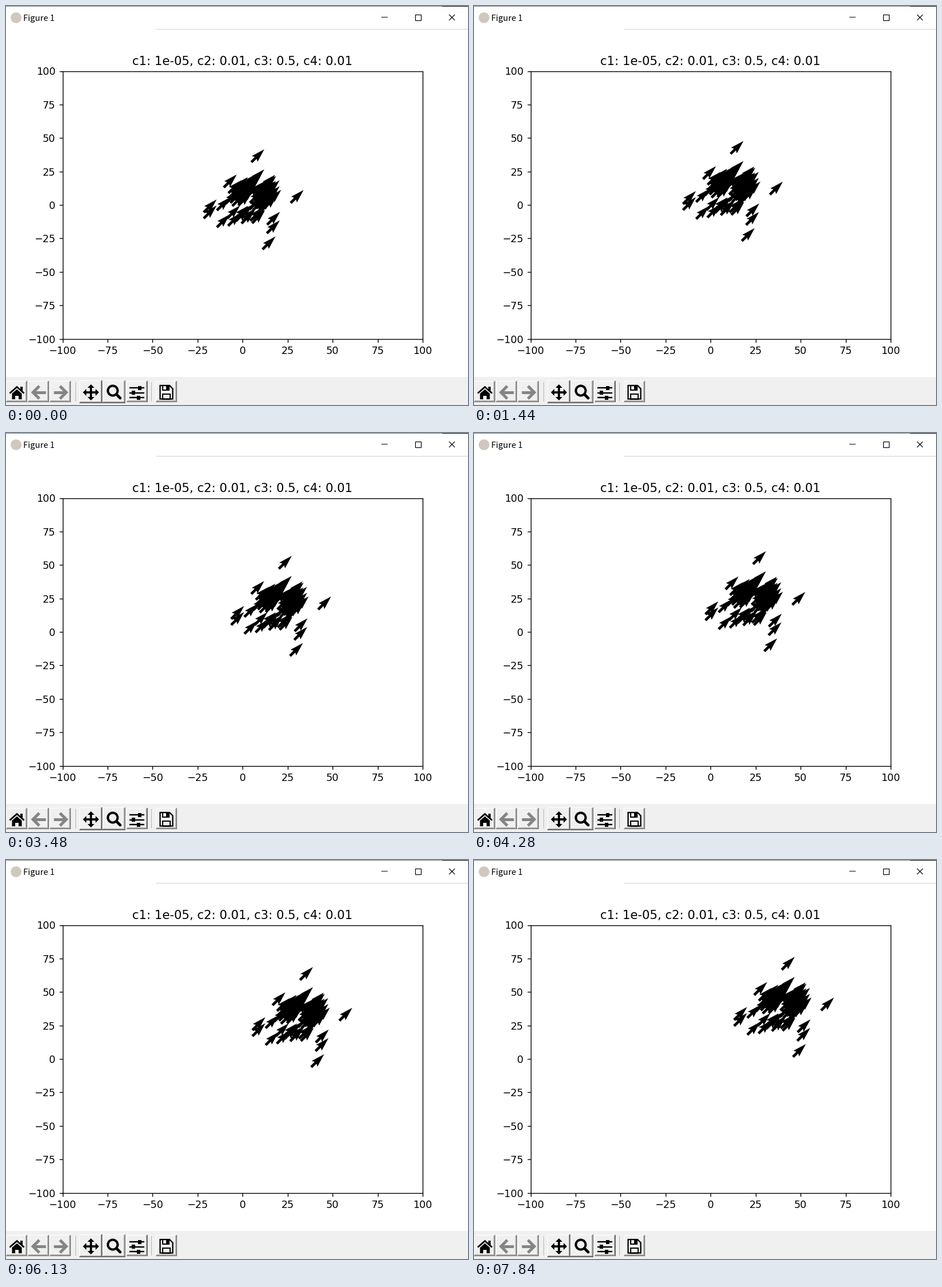
Recreate the animation shown at these times as a matplotlib script. Size 805x696 px, loop 8 s.

```python
import numpy as np
import matplotlib.pyplot as plt
from matplotlib.animation import FuncAnimation
from matplotlib.patches import Circle, Polygon, Rectangle

W, H, DPI = 805, 696, 100
PX = 72 / DPI          # one pixel in points
ZOOM = 1.265           # the window is shown enlarged
INTERVAL, LOOP = 20, 8000
TICK = 88.8            # ms between screen refreshes
FACE = "#f0f0f0"

fig = plt.figure(figsize=(W / DPI, H / DPI), dpi=DPI, facecolor="white")

# --- plot -------------------------------------------------------------
LEFT, RIGHT, TOP, BOTTOM = 98.5, 726, 113.5, 580.5
ax = fig.add_axes([LEFT / W, 1 - BOTTOM / H,
                   (RIGHT - LEFT) / W, (BOTTOM - TOP) / H])
ax.set(xlim=(-100, 100), ylim=(-100, 100),
       xticks=range(-100, 101, 25), yticks=range(-100, 101, 25))
ax.tick_params(length=3.5 * ZOOM, width=0.8 * ZOOM, pad=3.5 * ZOOM,
               labelsize=10 * ZOOM)
for spine in ax.spines.values():
    spine.set_linewidth(0.8 * ZOOM)
ax.set_title("c1: 1e-05, c2: 0.01, c3: 0.5, c4: 0.01",
             fontsize=12 * ZOOM, pad=6 * ZOOM)

# --- pixel-space layer for the window and the flock -------------------
ui = fig.add_axes([0, 0, 1, 1], facecolor="none")
ui.set(xlim=(0, W), ylim=(H, 0))
ui.axis("off")


def line(points, width=1.0, color="black", cap="butt"):
    x, y = zip(*points)
    ui.plot(x, y, color=color, lw=width * PX, solid_capstyle=cap,
            solid_joinstyle="miter")


def box(x, y, w, h, fill="black"):
    ui.add_patch(Rectangle((x, y), w, h, fc=fill, lw=0))


def frame(x, y, w, h, width):
    ui.add_patch(Rectangle((x, y), w, h, fill=False, ec="black",
                           lw=width * PX))


def poly(points):
    ui.add_patch(Polygon(points, fc="black", lw=0))


def title_bar():
    box(0, 0, 760, 1, "#7d7d7d")
    box(760, 0, 45, 1)
    box(261, 40, 544, 1, "#d0d0d0")
    ui.add_patch(Circle((17.5, 20.5), 9.3, fc="#cfc8bc", lw=0))
    ui.text(30, 26.3, "Figure 1", fontsize=14.7 * PX,
            family="Noto Sans CJK JP")
    box(654, 19, 11, 1.2)
    frame(713, 15, 9.5, 9.5, 1.2)
    line([(772, 15), (782, 25)], 1.2)
    line([(772, 25), (782, 15)], 1.2)


def button(cx, size=37):
    x, y = cx - size / 2, 672.5 - size / 2
    box(x, y, size, size, "#6d6d6d")
    box(x, y, size - 1.3, size - 1.3, "white")
    box(x + 1.3, y + 1.3, size - 2.6, size - 2.6, "#a5a5a5")
    box(x + 1.3, y + 1.3, size - 4, size - 4, FACE)


def home_icon(cx, cy):
    line([(cx - 12.5, cy + 1.5), (cx, cy - 9.5), (cx + 12.5, cy + 1.5)], 2.8)
    box(cx + 6, cy - 10.5, 3.5, 7)
    poly([(cx - 8.5, cy + 12), (cx - 8.5, cy + 2), (cx, cy - 5.3),
          (cx + 8.5, cy + 2), (cx + 8.5, cy + 12)])
    box(cx - 2.7, cy + 5.5, 5.4, 7, FACE)


def nav_icon(cx, cy, sign):
    gray = "#858585"
    line([(cx - 10 * sign, cy), (cx + 12 * sign, cy)], 5, gray)
    line([(cx + s, cy + h) for s, h in
          ((sign, -11), (-10 * sign, 0), (sign, 11))], 5, gray)


def pan_icon(cx, cy):
    line([(cx - 10, cy), (cx + 10, cy)], 3.8)
    line([(cx, cy - 10), (cx, cy + 10)], 3.8)
    for s in (-1, 1):
        poly([(cx + 14 * s, cy), (cx + 8 * s, cy - 6), (cx + 8 * s, cy + 6)])
        poly([(cx, cy + 14 * s), (cx - 6, cy + 8 * s), (cx + 6, cy + 8 * s)])


def zoom_icon(cx, cy):
    ui.add_patch(Circle((cx - 2, cy - 2.5), 8.5, fill=False, ec="black",
                        lw=4 * PX))
    line([(cx + 4.5, cy + 4), (cx + 11, cy + 10.5)], 4.8, cap="round")


def sliders_icon(cx, cy):
    for dy, knob in ((-8.5, 5), (0, -6), (8.5, 3)):
        line([(cx - 13, cy + dy), (cx + 13, cy + dy)], 2.4)
        box(cx + knob - 4, cy + dy - 3.5, 8, 7, FACE)
        box(cx + knob - 2.6, cy + dy - 3.5, 5.2, 7)


def save_icon(cx, cy):
    line([(cx - 11, cy - 12), (cx + 5.5, cy - 12), (cx + 11, cy - 6.5),
          (cx + 11, cy + 11.5), (cx - 11, cy + 11.5), (cx - 11, cy - 13)], 2.3)
    frame(cx - 6.5, cy + 2.5, 13, 9, 2)
    frame(cx - 6.5, cy - 12, 10.5, 7.5, 2)
    box(cx - 1, cy - 12, 4.5, 7)


def toolbar():
    box(0, 647, W, 49, FACE)
    for cx in (18.5, 56.5, 94.5, 228, 279.5):
        button(cx)
    for cx in (147.5, 188):
        button(cx, 40)
    for x in (120.5, 253):
        box(x, 656, 1.2, 34, "#b4b4b4")
    home_icon(19, 674)
    nav_icon(57, 674, 1)
    nav_icon(95, 674, -1)
    pan_icon(148, 674)
    zoom_icon(188, 673.5)
    sliders_icon(228, 674.5)
    save_icon(279.5, 674)


title_bar()
toolbar()


# --- flock: arrow tips in pixels at the start -------------------------
def cluster(cx, cy, rx, ry, tilt, n):
    """Spread n points evenly over a tilted ellipse (sunflower spiral)."""
    i = np.arange(n) + 0.5
    r, a = np.sqrt(i / n), i * np.pi * (3 - np.sqrt(5))
    u, v = rx * r * np.cos(a), ry * r * np.sin(a)
    c, s = np.cos(np.radians(tilt)), np.sin(np.radians(tilt))
    return np.column_stack([cx + u * c - v * s, cy + u * s + v * c])


stragglers = [(450, 250), (518.5, 321), (469.5, 402), (477, 374),
              (477.5, 359), (402, 294), (410, 304), (367, 337.5),
              (367, 348), (390, 334), (390, 363.5), (409.5, 361),
              (450, 285), (469, 294.5)]
tips = np.vstack([stragglers,
                  cluster(426, 310, 27, 14, -38, 17),
                  cluster(463, 319, 24, 17, -65, 24),
                  cluster(433, 351, 30, 6, 8, 9)])
VELOCITY = np.array([2.175, -1.62])

flock = ui.quiver(*tips.T, 22.5, 22.5, pivot="tip", units="dots",
                  scale_units="dots", scale=1, width=4.7)


def update(n):
    # four simulation steps fit in every seven screen refreshes
    refresh = int((n + 0.5) * INTERVAL / TICK)
    flock.set_offsets(tips + refresh * 4 // 7 * VELOCITY)
    return flock,


anim = FuncAnimation(fig, update, frames=LOOP // INTERVAL, interval=INTERVAL,
                     repeat=True, repeat_delay=0)
plt.show()
```
